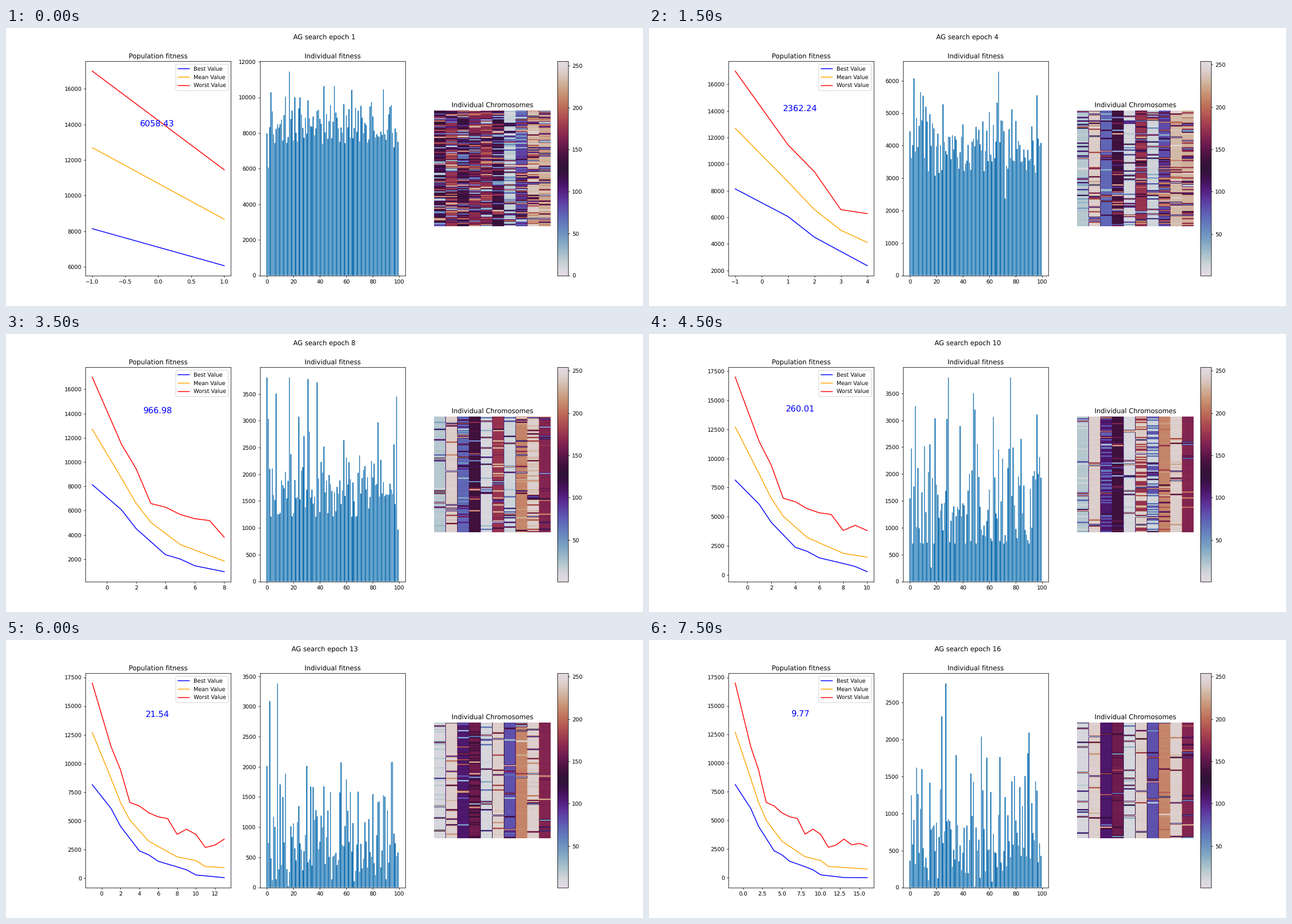
These frames come from a looping animation (1131x495 px, 8000 ms). A matplotlib script:

```python
import numpy as np
import matplotlib.pyplot as plt
from matplotlib.animation import FuncAnimation

plt.rcParams["font.family"] = "DejaVu Sans"
plt.rcParams["text.hinting"] = "none"

DPI = 70.7
EPOCHS = 16
POP = 100
X = np.array([-1, *range(1, EPOCHS + 1)])


def curve(points):
    """Value per epoch from a few turning points {epoch: value}."""
    return np.interp(X, list(points), list(points.values()))


BEST = curve({-1: 8140, 1: 6058.43, 2: 4505, 4: 2362.24, 5: 2010, 6: 1451.04,
              8: 966.98, 9: 705, 10: 260.01, 13: 21.54, 16: 9.77})
MEAN = curve({-1: 12700, 1: 8670, 2: 6580, 3: 5030, 5: 3200, 8: 1840,
              10: 1510, 11: 990, 16: 765})
WORST = curve({-1: 17000, 1: 11450, 2: 9430, 3: 6580, 4: 6280, 5: 5680, 6: 5330,
               7: 5180, 8: 3805, 9: 4250, 10: 3795, 11: 2660, 12: 2860,
               13: 3380, 14: 2880, 15: 3000, 16: 2757})

# Per column: founder gene, early gene, late gene, epoch of the takeover.
FOUNDER, EARLY, LATE, TAKEOVER = np.array([
    (138, 21, 9, 11.5), (176, 242, 243, 8), (140, 71, 107, 9.5),
    (168, 138, 157, 12.5), (168, 9, 9, 8), (136, 174, 243, 10.2),
    (14, 12, 80, 10.5), (84, 81, 210, 5), (237, 232, 243, 7),
    (228, 229, 165, 5)]).T


def fitness(e):
    """Skewed spread above the best, with survivors piled up at a floor."""
    rng = np.random.default_rng(100 + e)
    best, excess = BEST[e], MEAN[e] - BEST[e]
    k = 1.5 + 8 * np.exp(-(e - 1) / 5)
    v = best + excess * rng.gamma(k, 1 / k, POP)
    v = np.clip(v, min(BEST[e - 1], best + 0.4 * excess), WORST[e])
    lo, hi = rng.choice(POP, 2, replace=False)
    v[lo], v[hi] = best, WORST[e]
    return v


def genes(e):
    """Each column drifts from founder to early to late gene, with mutations."""
    rng = np.random.default_rng(500 + e)
    shape = (POP, len(LATE))

    def taken(epoch, rate):
        return rng.random(shape) < 1 / (1 + np.exp(rate * (epoch - e)))

    g = np.where(taken(2.5, 2), EARLY, FOUNDER)
    g = np.where(taken(TAKEOVER, 1.2), LATE, g)
    g = g + rng.normal(0, 1 + 5 * np.exp(1 - e), shape)
    mutated = rng.random(shape) < 0.09 + 0.4 * np.exp(-(e - 1) / 3)
    g = np.where(mutated, rng.integers(0, 256, shape), g)
    return np.repeat(np.clip(np.round(g), 0, 255), POP // len(LATE), axis=1)


def bar_edges():
    """Bar sides rounded to the pixel grid of a 1600 px wide canvas."""
    i = np.arange(POP)
    width = 1240 / 3.4
    left, scale = 200 + 1.2 * width, width / 109.78

    def snap(x):
        return (np.round(left + (x + 5.39) * scale) - left) / scale - 5.39

    return snap(i - 0.4), snap(i + 0.4)


fig, (ax_hist, ax_bar, ax_img) = plt.subplots(
    1, 3, figsize=(1131.01 / DPI, 495.01 / DPI), dpi=DPI)
title = fig.suptitle("")

ax_hist.set_title("Population fitness")
series = [(ax_hist.plot([], [], color=c, label=f"{name} Value")[0], data)
          for name, c, data in (("Best", "blue", BEST),
                                ("Mean", "orange", MEAN),
                                ("Worst", "red", WORST))]
ax_hist.legend(loc="upper right")
label = ax_hist.annotate("", (0, 0), xytext=(-1.5, 10), textcoords="offset points",
                         ha="center", color="blue", fontsize=15)

ax_bar.set_title("Individual fitness")
x0, x1 = bar_edges()
bars = ax_bar.bar(x0, np.ones(POP), x1 - x0, align="edge", color="C0", snap=False)
ax_bar.set_xlim(-5.39, 104.39)

ax_img.set_title("Individual Chromosomes")
ax_img.axis("off")
image = ax_img.imshow(genes(1), cmap="twilight", vmin=0, vmax=255)
fig.colorbar(image, ax=ax_img)


def update(i):
    e = i + 1
    title.set_text(f"AG search epoch {e}")

    for line, data in series:
        line.set_data(X[:e + 1], data[:e + 1])
    ax_hist.relim()
    ax_hist.autoscale_view()
    label.set_text(f"{BEST[e]:.2f}")
    label.xy = ((e - 1) / 2, 0.8 * WORST[0])

    values = fitness(e)
    for bar, v in zip(bars, values):
        bar.set_height(v)
    ax_bar.set_ylim(0, 1.05 * values.max())

    image.set_data(genes(e))
    inset = min(i, 1)
    image.set_clim(inset, 255 - inset)
    return []


anim = FuncAnimation(fig, update, frames=EPOCHS, interval=500,
                     repeat=True, repeat_delay=0, blit=False)
plt.show()
```
